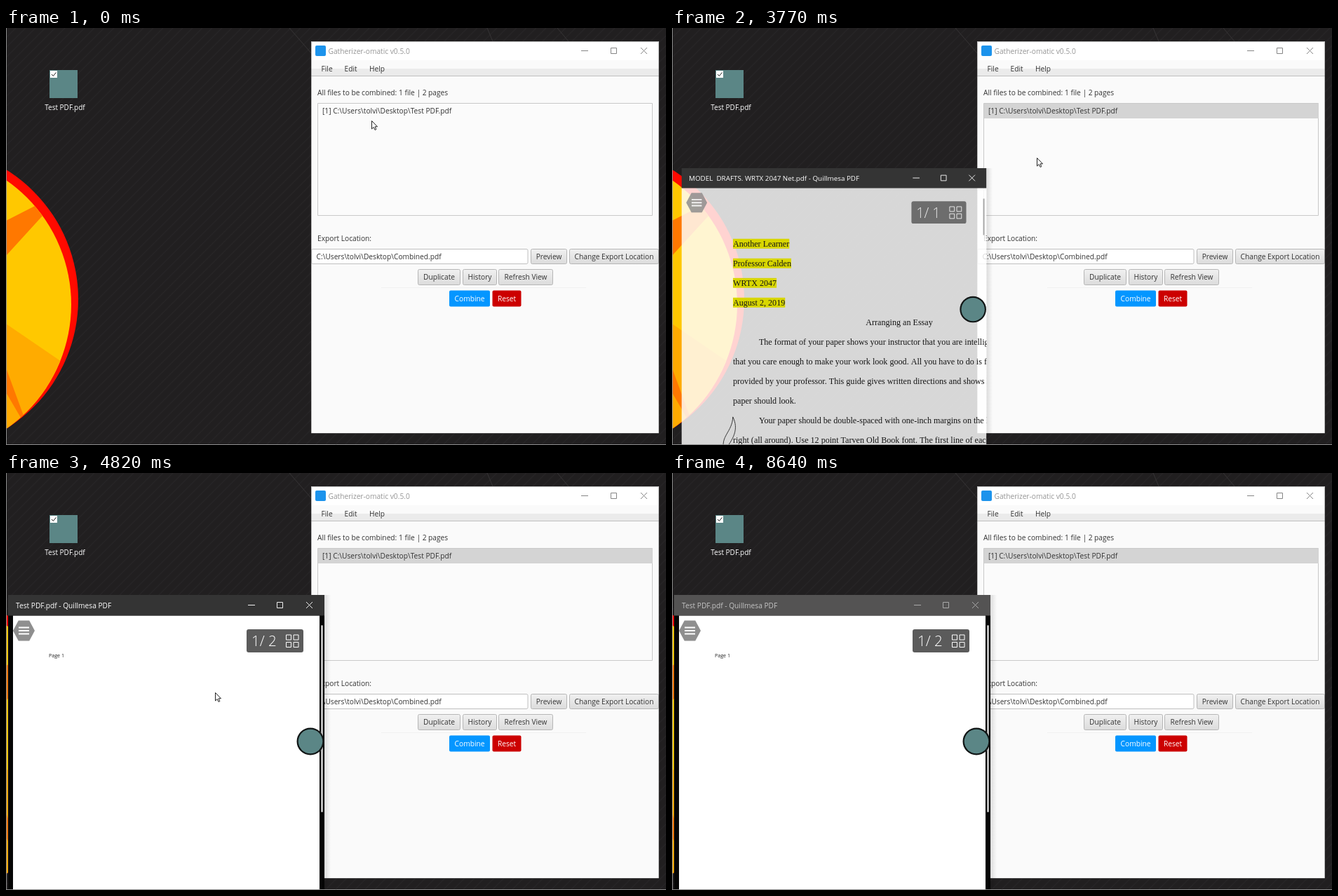
An HTML page with a canvas for the animation above (8740 ms loop, 941 by 595 pixels).

```html
<!DOCTYPE html>
<html lang="en">
<head>
<meta charset="utf-8">
<title>PDF merging demo</title>
<style>
html, body { margin: 0; width: 100%; height: 100%; overflow: hidden; background: #211f20; }
canvas { display: block; }
</style>
</head>
<body>
<canvas id="stage" width="941" height="595"></canvas>
<script>
const ctx = document.getElementById('stage').getContext('2d');
const W = 941, H = 595, LOOP = 8740;
const SANS = '"Open Sans", "Noto Sans", sans-serif';
const SERIF = '"Liberation Serif", "Noto Serif", serif';
const TEAL = '#5b8686', BLUE = '#1c93ec';
const USER_DIR = 'C:\\Users\\tolvi\\Desktop\\';

const AT = {
  focus: 400, pick: 580, dialog: 900, combo: 1340, list: 1580, chosen: 3340,
  closed: 3620, opening: 3750, opened: 3850, tabs: 4040, page: 4670, blur: 8640
};

// Bursts of activity: first refresh, last refresh, count. The screen rests in between.
const BURSTS = [[280, 1220, 7], [1340, 2150, 7], [2830, 3340, 5], [3620, 4550, 8],
  [4670, 5600, 8], [5750, 6020, 3], [6450, 7110, 6], [7390, 8200, 7], [8640, 8640, 1]];

// time, x, y
const PATH = [[280, 521, 132], [580, 519, 118], [1600, 560, 154], [2950, 522, 216],
  [3340, 521, 219], [3753, 520, 185], [4284, 487, 198], [4803, 298, 313],
  [5330, 243, 343], [7250, 243, 343], [8200, 945, 600]];

function ramp(t, from, to) {
  const u = Math.min(1, Math.max(0, (t - from) / (to - from)));
  return u * u * (3 - 2 * u);
}

function screenTime(clock) {
  const burst = BURSTS.filter(b => b[0] <= clock).pop();
  if (!burst) return 0;
  const [first, last, count] = burst;
  const gap = (last - first) / (count - 1) || 1;
  const step = Math.min(count - 1, Math.floor((clock - first) / gap + .25));
  return Math.round(first + gap * step);
}

function pointerAt(t) {
  let [, x, y] = PATH[0];
  PATH.slice(1).forEach(([end, ex, ey], i) => {
    const [start, sx, sy] = PATH[i], u = ramp(t, start, end);
    x += (ex - sx) * u;
    y += (ey - sy) * u;
  });
  return [x, y];
}

// Down page one, on to page two, then all the way back.
function scrollAt(t) {
  const down = 180 * ramp(t, 4950, 5600) + 395 * ramp(t, 5600, 6020);
  return t > 6020 ? 575 * (1 - ramp(t, 6130, 7110)) : down;
}

function rect(x, y, w, h, fill, stroke, r = 0) {
  ctx.beginPath();
  ctx.roundRect(x, y, w, h, r);
  if (fill) { ctx.fillStyle = fill; ctx.fill(); }
  if (stroke) { ctx.strokeStyle = stroke; ctx.stroke(); }
}

function disc(x, y, r, fill) {
  ctx.beginPath();
  ctx.arc(x, y, r, 0, 7);
  ctx.fillStyle = fill;
  ctx.fill();
}

function poly(points, fill, stroke, open) {
  ctx.beginPath();
  points.forEach(([x, y]) => ctx.lineTo(x, y));
  if (!open) ctx.closePath();
  if (fill) { ctx.fillStyle = fill; ctx.fill(); }
  if (stroke) { ctx.strokeStyle = stroke; ctx.stroke(); }
}

function line(x1, y1, x2, y2, color, w = 1) {
  ctx.lineWidth = w;
  poly([[x1, y1], [x2, y2]], null, color, true);
  ctx.lineWidth = 1;
}

// y is the middle of the capitals
function text(s, x, y, color = '#333', size = 10.2, align = 'left', family = SANS, weight = 400) {
  ctx.font = `${weight} ${size}px ${family}`;
  ctx.textAlign = align;
  ctx.fillStyle = color;
  ctx.fillText(s, x, y + size * .36);
}

function gradient(x1, y1, x2, y2, from, to) {
  const g = ctx.createLinearGradient(x1, y1, x2, y2);
  g.addColorStop(0, from);
  g.addColorStop(1, to);
  return g;
}

function shadow(blur) {
  ctx.shadowBlur = blur;
  ctx.shadowColor = blur ? 'rgba(0,0,0,.3)' : 'transparent';
}

function cross(x, y, r, color, w) {
  line(x - r, y - r, x + r, y + r, color, w);
  line(x - r, y + r, x + r, y - r, color, w);
}

// min, max and close marks, spaced evenly
function controls(x, gap, y, color, minColor = color) {
  line(x - 5, y + .5, x + 5, y + .5, minColor);
  rect(x + gap - 4.5, y - 3.5, 8, 8, null, color);
  cross(x + 2 * gap + .5, y + .5, 4.5, color);
}

function desktop() {
  rect(0, 0, W, H, '#211f20');
  for (let x = -H; x < W; x += 14) line(x, H, x + H, 0, '#272526', 1.5);
  line(404, 0, 437, 38, '#363435');
  line(686, 0, 694, 19, '#363435');
  line(786, 0, 802, 19, '#363435');

  disc(-114.6, 387, 217.6, '#ff0a00');
  ctx.save();
  ctx.beginPath();
  ctx.arc(-122.9, 394.5, 215.9, 0, 7);
  ctx.clip();
  rect(0, 200, 110, 380, '#ffc800');
  poly([[0, 275], [41, 254], [52, 268], [0, 325]], '#ff7800');
  poly([[0, 422], [79, 476], [100, 580], [0, 580]], '#ffab00');
  poly([[0, 485], [25, 553], [21, 556], [0, 520]], '#ff7800');
  ctx.restore();

  rect(62, 60, 40, 40, TEAL);
  rect(63, 61, 10, 10, '#fff');
  poly([[65, 66], [67.3, 68.5], [71.3, 63.5]], null, '#222', true);
  text('Test PDF.pdf', 84, 113.5, '#fff', 10, 'center');
  line(.5, 0, .5, H, '#8c8c8c');
}

function button(label, x, y, w, h = 21) {
  rect(x + .5, y + .5, w, h, gradient(0, y, 0, y + h, '#f1f1f1', '#dcdcdc'), '#b6b6b6', 2);
  text(label, x + w / 2 + .5, y + 11, '#333', 10.2, 'center');
}

function flatButton(label, x, w, color) {
  rect(x, 374.5, w, 23, color, null, 2);
  text(label, x + w / 2, 386, '#fff', 10.2, 'center');
}

function mainWindow(t) {
  const active = t >= AT.focus && t < AT.dialog || t >= AT.closed && t < AT.opening;
  const modal = t >= AT.dialog && t < AT.closed;
  rect(435, 19, 496, 559, '#fafafa');
  rect(435, 19, 496, 27, '#fff');
  rect(441, 25, 15, 15, BLUE, null, 2);
  text('Gatherizer-omatic v0.5.0', 459.5, 33, active ? '#111' : '#969696');
  controls(825, 42, 32, active ? '#222' : '#858585');
  rect(435, 58, 496, 10, '#ebebeb');
  line(435, 68.5, 931, 68.5, '#bfbfbf');
  text('File', 449.5, 58);
  text('Edit', 482.5, 58);
  text('Help', 518, 58);
  text('All files to be combined: 1 file | 2 pages', 444, 92.5);
  rect(444.5, 107.5, 477, 160, '#fbfbfb', '#c9c9c9');
  if (t >= AT.pick) rect(445, 108, 477, 21, modal ? '#cbcbcb' : '#d4d4d4');
  text('[1] ' + USER_DIR + 'Test PDF.pdf', 451, 118.5);
  text('Export Location:', 444, 300);
  rect(435.5, 315.5, 308.5, 21, '#fff', '#c0c0c0', 2);
  text(USER_DIR + 'Combined.pdf', 442.5, 326);
  button('Preview', 748, 315, 51);
  button('Change Export Location', 803, 315, 127);
  button('Duplicate', 587, 344, 60, 22);
  button('History', 651, 344, 48, 22);
  button('Refresh View', 702, 344, 77, 22);
  line(535, 370.5, 827, 370.5, '#f1f1f1');
  flatButton('Combine', 632, 58, '#0496ff');
  flatButton('Reset', 693.5, 41, '#cc0000');
  rect(435.5, 19.5, 495, 559, null, 'rgba(110,110,110,.45)');
}

function actionList(py) {
  shadow(8);
  rect(475.5, 168, 121, 85, '#fff');
  shadow(0);
  rect(475.5, 168.5, 121, 84, null, '#bdbdbd');
  ['Move', 'Remove From List', 'Open File', 'Remove a Page'].forEach((label, i) => {
    const y = 168.5 + i * 21, hot = py >= y && py < y + 21;
    if (hot) rect(476, y, 120, 21, '#0096c9');
    text(label, 480, y + 10.5, hot ? '#fff' : '#333');
  });
}

function dialog(t, py) {
  if (t < AT.dialog || t >= AT.closed) return;
  ctx.globalAlpha = .6 + .4 * ramp(t, AT.dialog, AT.dialog + 150);
  shadow(10);
  rect(390, 78, 293, 137, '#f2f2f2');
  shadow(0);
  rect(390, 78, 293, 27, '#fff');
  rect(390.5, 78.5, 293, 136, null, '#757575');
  rect(396, 84, 15, 15, BLUE, null, 2);
  text('Picker-omatic', 414, 91.5, '#111');
  controls(577, 42, 91, '#222', '#ccc');
  text('Choose the action for file [1]:', 536.5, 130.5, '#333', 10.2, 'center');
  rect(475.5, 145.5, 121, 21.5, gradient(0, 145, 0, 167, '#e9e9e9', '#d5d5d5'),
    t >= AT.combo ? '#17a3d1' : '#b6b6b6', 2);
  poly([[582, 154], [590, 154], [586, 158.5]], '#333');
  if (t >= AT.chosen) text('Open File', 483, 156.5);
  else if (t >= AT.list) actionList(py);
  ctx.globalAlpha = 1;
}

function menuHex() {
  const corners = Array.from({ length: 6 }, (_, i) =>
    [25.5 + 15.5 * Math.cos(i * Math.PI / 3), 225 + 16.7 * Math.sin(i * Math.PI / 3)]);
  poly(corners, '#8f8f8f');
  for (let i = -1; i < 2; i++) line(18, 225 + i * 4.5, 33, 225 + i * 4.5, '#fff', 2);
}

function pageBadge(page, count) {
  rect(343, 223, 81, 33, '#5b5b5b', null, 3);
  text(`${page}/ ${count}`, 350, 240, '#fff', 20.5, 'left', SANS, 300);
  for (let i = 0; i < 4; i++) {
    rect(399.5 + i % 2 * 10.5, 231 + (i >> 1) * 10.5, 7, 7, null, '#fff');
  }
}

function sideButton() {
  disc(434, 383, 19.5, '#101414');
  disc(434, 383, 17.3, TEAL);
}

function titleBar(title, inactive) {
  rect(3, 174, 451, 29.5, inactive ? '#545353' : '#343434');
  text(title, 14, 189.5, inactive ? '#c4c4c4' : '#fff');
  controls(350, 41, 188, inactive ? '#aaa' : '#f0f0f0');
}

const HEADER = ['Another Learner', 'Professor Calden', 'WRTX 2047', 'August 2, 2019'];
const BODY = [
  'The format of your paper shows your instructor that you are intelligent and',
  'that you care enough to make your work look good. All you have to do is follow',
  'provided by your professor. This guide gives written directions and shows how',
  'paper should look.',
  'Your paper should be double-spaced with one-inch margins on the left',
  'right (all around). Use 12 point Tarven Old Book font. The first line of each'
];

function paper(alpha) {
  const left = 79.2, pitch = 29.04, size = 12.55;
  const write = (s, x, row, align) =>
    text(s, x, 286 + row * pitch, '#161616', size, align, SERIF);
  ctx.globalAlpha = alpha;
  rect(3, 203, 451, 440, '#fff');
  ctx.globalAlpha = 1;
  HEADER.forEach((s, i) => {
    ctx.font = `${size}px ${SERIF}`;
    rect(left, 278.5 + i * pitch, ctx.measureText(s).width, 14.5, '#d8d600');
    write(s, left, i);
  });
  write('Arranging an Essay', 325, 4, 'center');
  BODY.forEach((s, i) => write(s, i % 4 ? left : left + 38.3, 5 + i));
  ctx.beginPath();
  ctx.moveTo(66, 592);
  ctx.bezierCurveTo(60, 570, 78, 565, 79, 542);
  ctx.bezierCurveTo(88, 560, 80, 575, 66, 592);
  ctx.strokeStyle = '#333';
  ctx.stroke();
  rect(449, 219, 2, 54, '#a4a4a4');
}

function sideIcons() {
  const c = '#d0d0d0';
  disc(25, 225, 7, '#858585');
  rect(3, 247, 43, 42, '#272727');
  rect(43.5, 247, 3, 42, TEAL);
  poly([[18.5, 270], [22, 263.5], [30, 263.5], [31.5, 270]], null, c);
  line(18, 272.5, 32, 272.5, c);
  text('6', 30.5, 259, '#fff', 8);
  rect(22.5, 304.5, 8, 10, null, c);
  poly([[22, 307.5], [19.5, 307.5], [19.5, 317.5], [27.5, 317.5], [27.5, 315]], null, c, true);
  rect(18.5, 350.5, 13, 8, null, c, 1);
  for (let x = 21; x < 30; x += 3) rect(x, 354, 2, 1.5, c);
  for (const x of [18.5, 26.5]) {
    rect(x, 397, 5.5, 6, null, c, 1);
    rect(x + 1, 391.5, 3.5, 5, c);
  }
  line(23, 397, 27, 397, c);
  line(8, 418.5, 42, 418.5, '#454545');
  rect(18, 434, 14, 14, '#767676', null, 1);
  rect(21, 435, 8, 4, '#343434');
  rect(22, 443, 6, 4, '#343434');
}

function closeDot(x, y) {
  disc(x, y, 7.5, '#eee');
  cross(x, y, 2.8, '#111', 1.8);
}

function formThumb() {
  rect(60, 520, 144, 75, '#191919');
  rect(85, 522, 94.5, 73, '#e0e0e0');
  disc(96, 533, 5, '#999');
  text('Request for sample records', 104, 532, '#666', 3);
  text('SAMPLE FORM SHEET', 149, 532, '#333', 2.8, 'left', SANS, 700);
  text('Fill in every part that applies to you', 93, 548, '#333', 3, 'left', SANS, 700);
  for (let i = 0; i < 4; i++) line(146, 541.5 + i * 3, 170, 541.5 + i * 3, '#888');
  for (let i = 0; i < 16; i++) {
    const x = 92 + i % 4 * 21, y = 556.5 + (i >> 2) * 8.5;
    line(x, y, x + 7 + i * 5 % 7, y, '#9a9a9a');
  }
  closeDot(202, 522);
}

function tabsView() {
  rect(3, 203, 43, 392, '#343434');
  rect(46, 203, 172, 392, '#2a2a2a');
  rect(218, 205, 228, 390, '#747474');
  rect(446, 203, 8, 392, '#050505');
  sideIcons();
  text('Tabs', 60.5, 226, '#d5d5d5', 18.5, 'left', SANS, 300);
  line(192.5, 229.5, 196, 226, '#ccc');
  poly([[193, 224], [197.5, 228.5], [201, 223.5], [198, 220.5]], null, '#ccc');
  line(46, 247.5, 218, 247.5, '#383838');
  rect(61.5, 262.5, 5, 8, null, '#bbb');
  rect(69.5, 267.5, 5, 7, null, '#bbb');
  line(64, 261.5, 70, 261.5, '#bbb');
  text('View & Layout', 84.5, 270.5, '#b2b2b2', 12.7);
  poly([[200, 264], [203.5, 268], [200, 272]], null, '#bbb', true);
  line(46, 289.5, 218, 289.5, '#383838');
  ctx.setLineDash([5, 5]);
  poly([[62.5, 290], [62.5, 316.5], [202.5, 316.5], [202.5, 290]], null, '#aaa', true);
  ctx.setLineDash([]);
  ctx.lineWidth = 3;
  rect(61.5, 348.5, 141, 140.5, '#191919', TEAL);
  ctx.lineWidth = 1;
  rect(85, 350, 94.5, 122, '#e9e9e9');
  rect(63, 473, 138, 14, '#101010');
  text('Page 1', 96, 362, '#555', 2);
  text('Test PDF.pdf', 67, 481, '#eee', 8.4);
  closeDot(202, 349);
  formThumb();
  rect(214.5, 346, 2, 141, '#9b9b9b');
}

function pageView(scroll) {
  const page = scroll > 380 ? 2 : 1;
  rect(3, 203, 451, 392, '#050505');
  ctx.save();
  ctx.beginPath();
  ctx.rect(10, 203.5, 437, 391.5);
  ctx.clip();
  rect(10, 203, 437, 392, '#747474');
  for (let p = 0; p < 2; p++) {
    const top = 203 - scroll + p * 575;
    rect(10, top, 437, 570, '#fff');
    text(`Page ${p + 1}`, 61, top + 57, '#222', 7.1);
  }
  ctx.restore();
  const thumb = page === 1 ? Math.min(scroll, 180) * .69 : 0;
  rect(449, 217 + thumb, 3, 267, '#b9b9b9', null, 1.5);
  menuHex();
  pageBadge(page, 2);
}

function reader(t) {
  if (t < AT.opening) return;
  const opening = t < AT.opened, oldPaper = t < AT.tabs;
  ctx.save();
  if (opening) {
    ctx.translate(10.6, 32.2);
    ctx.scale(.9644, .9644);
  }
  rect(454, 174, 9, 440, gradient(454, 0, 463, 0, 'rgba(0,0,0,.12)', 'rgba(0,0,0,0)'));
  ctx.beginPath();
  ctx.rect(3, 174, 451, 460);
  ctx.clip();
  if (oldPaper) {
    paper(opening ? .82 : 1);
    ctx.globalAlpha = opening ? .85 : 1;
    menuHex();
    pageBadge(1, 1);
    ctx.globalAlpha = 1;
  } else if (t < AT.page) {
    tabsView();
  } else {
    pageView(scrollAt(t));
  }
  sideButton();
  const file = oldPaper ? 'MODEL  DRAFTS. WRTX 2047 Net.pdf' : 'Test PDF.pdf';
  titleBar(file + ' - Quillmesa PDF', t >= AT.blur);
  ctx.restore();
}

function pointer(x, y) {
  ctx.save();
  ctx.translate(x + .5, y + .5);
  poly([[0, 0], [0, 11.5], [2.7, 9], [4.6, 13], [6.3, 12.2], [4.6, 8.3], [8, 8.3]], '#fff', '#222');
  ctx.restore();
}

function draw(clock) {
  const t = screenTime(clock);
  const [px, py] = pointerAt(t);
  desktop();
  mainWindow(t);
  dialog(t, py);
  reader(t);
  line(0, H - .5, W, H - .5, '#8c8c8c');
  pointer(px, py);
}

const start = performance.now();
function tick() {
  draw((performance.now() - start) % LOOP);
  requestAnimationFrame(tick);
}
tick();
</script>
</body>
</html>
```
